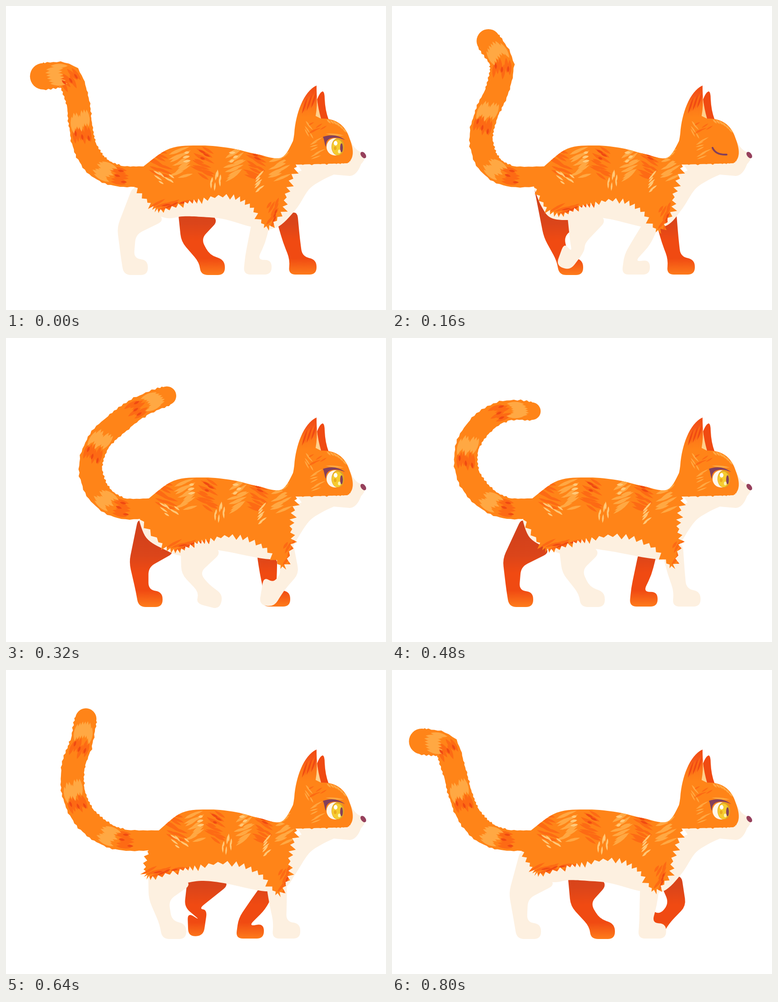
Write an HTML page with a canvas that moves like this. It is 837 by 669 pixels and loops after 880 ms.

```html
<!DOCTYPE html>
<html lang="en">
<head>
<meta charset="utf-8">
<title>Walking cat</title>
<style>
html, body { margin: 0; overflow: hidden; background: #fff; }
canvas { display: block; }
</style>
</head>
<body>
<canvas id="stage" width="837" height="669"></canvas>
<script>
const ctx = document.getElementById('stage').getContext('2d');
const { PI, cos, sin, atan2, hypot, max, min } = Math;
const STEPS = 11, STEP_MS = 80;
const ORANGE = '#ff8418', LIGHT = '#ffa843', PALE = '#ffc878', DARK = '#fd6a14',
      RED = '#f04a12', CREAM = '#fdf0e0', PLUM = '#83405c';

let step = 0;
// Cosine of the walk cycle, highest at the given step
const wave = (peak, beats = 1) => cos(2 * PI * beats * (step - peak) / STEPS);
const phase = start => ((step - start) % STEPS + STEPS) % STEPS;

let seed = 1;
const random = () => (seed = seed * 16807 % 2147483647) / 2147483647;
const spread = size => (random() - .5) * size;

// Catmull-Rom point at u, where whole numbers hit the given points
function at(points, u) {
  const last = points.length - 1, i = min(Math.floor(u), last - 1), t = u - i;
  const [a, b, c, d] = [-1, 0, 1, 2].map(k => points[max(0, min(last, i + k))]);
  return [0, 1].map(k => b[k] + t / 2 * (c[k] - a[k]
    + t * (2 * a[k] - 5 * b[k] + 4 * c[k] - d[k] + t * (3 * (b[k] - c[k]) + d[k] - a[k]))));
}
// Unit vector across the line from a to b
function across(a, b) {
  const dx = b[0] - a[0], dy = b[1] - a[1], length = hypot(dx, dy) || 1;
  return [-dy / length, dx / length];
}
const normal = (points, u) =>
  across(at(points, max(0, u - .05)), at(points, min(points.length - 1, u + .05)));
const offset = ([x, y], [nx, ny], d) => [x + nx * d, y + ny * d];

// Smooth line; with spike, every other sample sticks out as a tuft of fur
function curve(points, spike = 0) {
  return Array.from({ length: points.length * 8 - 7 }, (_, i) =>
    offset(at(points, i / 8), normal(points, i / 8), spike * (i % 2 ? random() : -.4)));
}
function shape(points) {
  const path = new Path2D();
  points.forEach(([x, y]) => path.lineTo(x, y));
  path.closePath();
  return path;
}
function rounded(points, radius) {
  const path = new Path2D(), n = points.length;
  points.forEach((p, i) => {
    const toward = q => {
      const length = hypot(q[0] - p[0], q[1] - p[1]) || 1, k = min(radius / length, .5);
      return [p[0] + (q[0] - p[0]) * k, p[1] + (q[1] - p[1]) * k];
    };
    path.lineTo(...toward(points[(i + n - 1) % n]));
    path.quadraticCurveTo(...p, ...toward(points[(i + 1) % n]));
  });
  return path;
}
function fill(path, color) {
  ctx.fillStyle = color;
  ctx.fill(typeof path === 'string' ? new Path2D(path) : path);
}
function ellipse(x, y, rx, ry, color, turn = 0) {
  ctx.fillStyle = color;
  ctx.beginPath();
  ctx.ellipse(x, y, rx, ry, turn, 0, 7);
  ctx.fill();
}
function tuft(x, y, length, thick, angle, color) {
  ctx.save();
  ctx.translate(x, y);
  ctx.rotate(angle);
  fill(`M${-length / 2},0Q0,${-thick} ${length / 2},0Q0,${thick} ${-length / 2},0`, color);
  ctx.restore();
}
// A column of tufts centred on x, y
function tufts(color, count, x, y, w, h, length, thick, angle) {
  for (let i = 0; i < count; i++)
    tuft(x + spread(w), y + (i + .5) / count * h - h / 2, length * (.7 + random() * .6),
         thick, angle + spread(.4), color);
}

function gradient(top, bottom, ...colors) {
  const g = ctx.createLinearGradient(0, top, 0, bottom);
  colors.forEach((color, i) => g.addColorStop(i / (colors.length - 1), color));
  return g;
}
const farFur = gradient(440, 594, '#d4421b', '#db451a', RED, RED, '#ff7f1c');
const earFur = gradient(175, 245, RED, '#f5581a', '#fd7818', ORANGE);

// Thigh, shin and paw; turn swings the paw around the ankle
function limb(hipBack, hipFront, knee, kneeWidth, ankle, heel, turn, color) {
  const hip = [0, 1].map(k => (hipBack[k] + hipFront[k]) / 2);
  const n1 = across(hip, ankle), n2 = across(knee, ankle), c = cos(turn), s = sin(turn);
  const paw = [[heel, 36], [45, 36], [45, 3]].map(([x, y]) =>
    [ankle[0] + x * c - y * s, ankle[1] + x * s + y * c]);
  fill(rounded([hipBack, offset(knee, n1, kneeWidth), offset(ankle, n2, 14), ...paw,
    offset(ankle, n2, -14), offset(knee, n1, -kneeWidth), hipFront], 16), color);
}
// The paw slides back on the ground, then swings forward
function hindLeg(p, rump, color) {
  const s = max(0, (p - 7) / 4), arc = sin(PI * s), turn = 3.2 * sin(PI * s ** .25);
  const x = s ? 266 + 180 * s + 80 * arc * arc : 356 + 90 * cos(PI * p / 7);
  const reach = x - 266, thigh = x + 35 * arc;
  limb([max(rump, thigh - 64), 395], [.7 * thigh + 162, 472],
       [x - 2 - .16 * reach + 55 * max(0, turn - 1.5), 495 + .12 * reach + 8 * arc],
       22 - 6 * arc, [x, 556 - 16 * arc], -8, turn, color);
}
function foreLeg(p, lean, color) {
  const s = max(0, (p - 8) / 3), arc = sin(PI * s), shoulder = 568 + 1.2 * lean;
  const x = s ? 523 + 116 * s : 581 + 58 * cos(PI * p / 8);
  limb([shoulder - 23, 470], [shoulder + 23, 450], [(shoulder + x) / 2 + 25 * arc, 516],
       19, [x, 555 - 8 * arc], -17, 2 * arc, color);
}

// Each joint sways later and wider than the one before it
function tailLine(rump, shift) {
  const mean = [28, 60, 88, 106, 110, 93], sway = [8, 17, 23, 31, 45, 93],
        peak = [3.4, 2.9, 3.4, 4.3, 5.2, 5.4], length = 56 + 4 * wave(4.5);
  let x = 248 + .4 * shift, y = 374;
  const line = [[rump + 28, 374], [x, y]];
  mean.forEach((angle, i) => {
    const a = (angle + sway[i] * wave(peak[i])) * PI / 180;
    line.push([x -= length * cos(a), y -= length * sin(a)]);
  });
  return line;
}
function drawTail(line) {
  seed = 77;
  const width = 25, tip = 24 + 5 * wave(0);
  const half = u => u < 2 ? 21 + (width - 21) * u / 2 : u > 5 ? width + (tip - width) * (u - 5) / 2 : width;
  const side = sign => Array.from({ length: 71 }, (_, i) =>
    offset(at(line, i / 10), normal(line, i / 10), sign * (half(i / 10) + (i % 2 ? random() * 3 : 0))));
  fill(shape([...side(1), ...side(-1).reverse()]), ORANGE);
  ellipse(...line[7], tip, tip, ORANGE);
  const band = (u, color, count, length, thick) => {
    for (let i = 0; i < count; i++) {
      const v = u + spread(.3), n = normal(line, v);
      const [x, y] = offset(at(line, v), n, ((i + .5) / count * 2 - 1) * (half(u) - 5));
      tuft(x, y, length, thick, atan2(n[1], n[0]) + PI / 2, color);
    }
  };
  for (const u of [.95, 3.4, 5.8]) {
    band(u, DARK, 6, 34, 8);
    band(u + .65, LIGHT, 7, 38, 9);
    band(u, RED, 3, 14, 5);
  }
}

function drawCoat(rump, shift, haunch, drop, lean) {
  seed = 11;
  // x, y, then how far the point follows the haunch and the shoulder
  const edge = [[305, 438, .7, 0], [325, 452, 1, 0], [385, 436, .6, 0], [430, 427, .4, 0],
    [500, 420, .1, .3], [545, 448, 0, .8], [575, 490, 0, 1], [610, 455, 0, .6], [622, 400, 0, .2]]
    .map(([x, y, h, f]) => [x + h * haunch + f * lean, y + (x < 600 ? drop : 0)]);
  const back = [[606, 334], [552, 326], [495, 313], [430, 307], [360, 314], [300, 355]]
    .map(([x, y]) => [x + shift * (606 - x) / 240, y]);
  const coat = shape([...curve([[rump, 395], ...edge, [642, 350]], 11), [700, 345],
    ...curve([[633, 296], ...back])]);
  fill(coat, ORANGE);
  ctx.save();
  ctx.clip(coat);
  const [rumpX, rumpY] = edge[1], [chestX, chestY] = edge[6];
  tufts(DARK, 14, rumpX + 28, rumpY - 12, 80, 18, 34, 6, -.35);
  tufts(RED, 4, rumpX + 32, rumpY - 14, 50, 10, 18, 4, -.35);
  tufts(DARK, 10, chestX + 16, chestY - 34, 20, 48, 26, 6, -1);
  tufts(RED, 3, chestX + 18, chestY - 28, 12, 24, 13, 4, -1);
  ctx.translate(shift * 740 / 300, 0);
  ctx.scale(1 - shift / 300, 1);
  [337, 384, 436, 502, 552, 602].forEach((x, i) =>
    tufts(i % 2 ? LIGHT : DARK, 13, x, 344 + i, 22, 62, 34, 6, i % 2 ? 2.7 : .4));
  [345, 460, 556].forEach((x, i) =>
    tufts(PALE, 7, x, 378 + 5 * i, 40 - 14 * i, 24 + 9 * i, 18, 4, .7 + i * .9));
  for (const x of [392, 500]) tufts(PALE, 3, x, 332, 14, 28, 14, 6, 2.9);
  for (const x of [438, 550]) tufts(RED, 3, x, 328, 14, 22, 14, 5, .4);
  ctx.restore();
}

function drawEye() {
  ellipse(725, 310, 19, 19, '#fff6e8');
  ellipse(731, 310, 14, 19, '#e0a424');
  ellipse(730, 311, 12, 17, '#f6cb30');
  ellipse(739, 312, 3, 10, PLUM);
  ellipse(726, 302, 4, 5, '#fff');
  ellipse(734, 320, 3, 4, '#fff3b0');
  ellipse(725, 313, 3, 4, '#eaa91e');
  fill('M698,288C714,282 732,283 747,295C732,288 716,288 709,295Q704,300 705,310C701,304 702,296 698,288Z', PLUM);
}

function drawHead(open) {
  seed = 5;
  fill('M685,206Q692,188 698,188Q702,190 702,205Q703,230 711,251L690,250Z', RED);
  fill('M757,292C763,308 772,318 783,322L792,332Q788,342 782,348Q773,373 757,374L722,371C700,375 690,384 672,394L640,345L755,330Z', CREAM);
  fill('M606,335C624,331 632,306 635,280C638,238 655,188 684,175C684,200 686,225 693,248C730,246 749,266 757,292C766,315 768,336 752,346L640,349Z', earFur);
  fill(shape(curve([[632, 347], [700, 347], [740, 346], [759, 339]], 4)), ORANGE);
  fill('M684,198Q688,228 694,248L682,242Q686,220 684,198Z', '#ffd08c');
  for (let i = 0; i < 5; i++) tuft(658 + i * 5, 219 - i * 3, 38, 4, -1.25, i % 2 ? DARK : RED);
  for (let i = 0; i < 6; i++) tuft(711 + i * 7, 254 + i * i * .8, 13, 4, .8, LIGHT);
  tufts(DARK, 5, 684, 268, 36, 22, 20, 3, -.4);
  tufts(LIGHT, 5, 668, 272, 16, 34, 18, 3, .9);
  tufts(LIGHT, 7, 682, 314, 30, 44, 24, 3, -.4);
  ctx.save();
  if (open) {
    ctx.translate(0, 318 * (1 - open));
    ctx.scale(1, open);
    tuft(724, 283, 40, 4, .1, LIGHT);
    drawEye();
  } else {
    ctx.strokeStyle = PLUM;
    ctx.lineWidth = 4;
    ctx.lineCap = 'round';
    ctx.stroke(new Path2D('M706,312Q713,328 737,327'));
  }
  ctx.restore();
  ellipse(787, 328, 8, 5, '#96405c', .9);
}

function draw() {
  const shift = 13 + 14 * wave(2.4, 2), rump = 280 + 1.2 * shift;
  const haunch = 25 + 30 * wave(3.3), drop = 8 + 10 * wave(4.8);
  const lean = 20 + 22 * wave(5.5), farLean = 20 - 22 * wave(5.5);
  const blink = max(0, 1 - Math.abs(step - 2) / 2);

  ctx.fillStyle = '#fff';
  ctx.fillRect(0, 0, 837, 669);
  hindLeg(phase(10), rump, farFur);
  foreLeg(phase(0), farLean, farFur);
  const under = curve([[rump, 395], [rump + 18, 440], [350, 466], [390, 464 + .9 * drop], [430, 464],
    [480, 469], [548 + lean, 487], [597 + .8 * lean, 487 - .4 * lean], [638, 448], [667, 404],
    [695, 384], [722, 371]]);
  fill(shape([...under, [700, 345], [600, 380], [400, 380]]), CREAM);
  hindLeg(phase(4.4), rump, CREAM);
  foreLeg(phase(5), lean, CREAM);
  drawTail(tailLine(rump, shift));
  drawCoat(rump, shift, haunch, drop, lean);
  drawHead(1 - blink);
}

let shown = -1;
function tick() {
  step = Math.floor(performance.now() / STEP_MS) % STEPS;
  if (step !== shown) draw();
  shown = step;
  requestAnimationFrame(tick);
}
tick();
</script>
</body>
</html>
```
